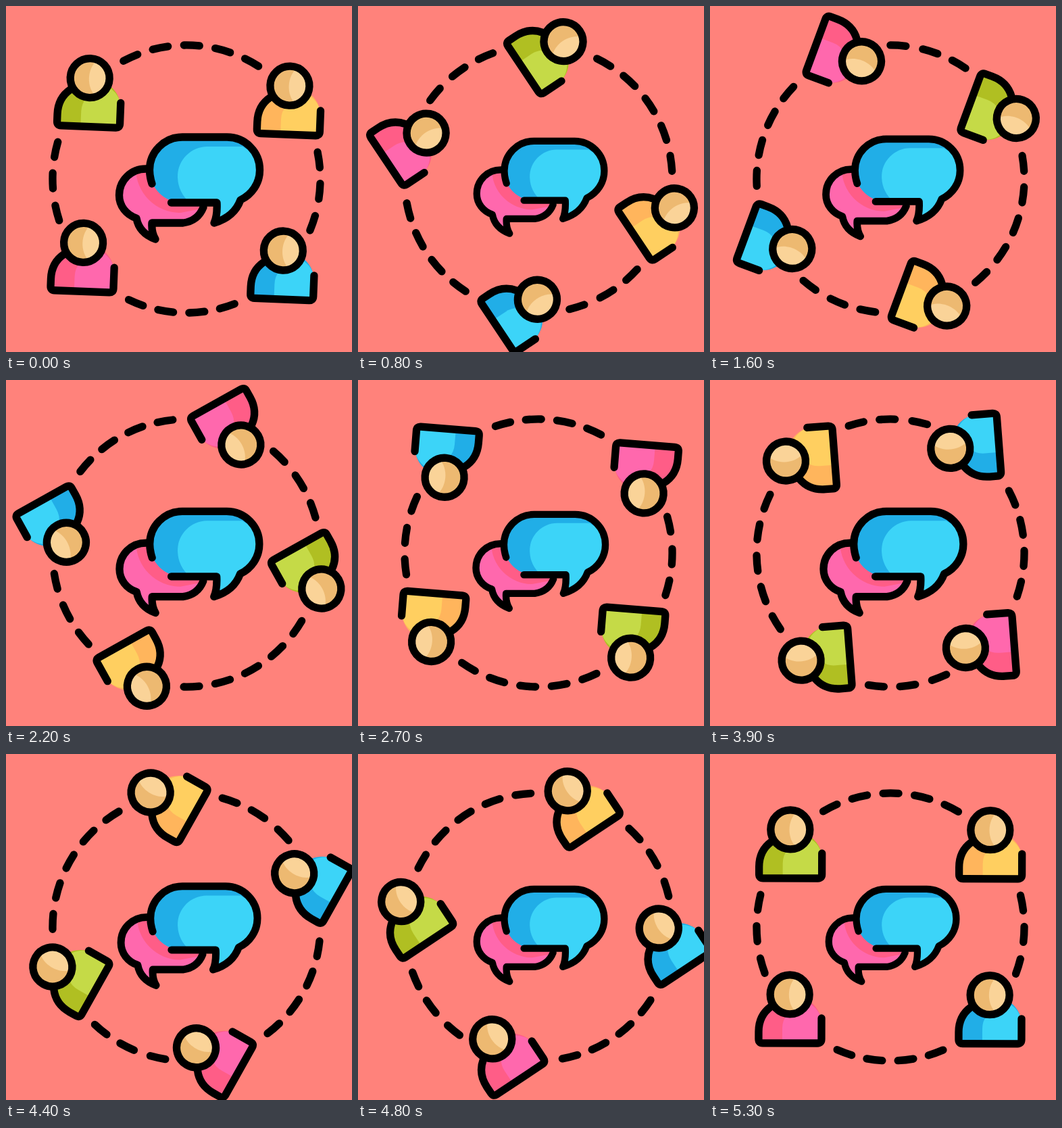
An HTML page for the animation above (5.4 s loop, 512x512 px).

```html
<!DOCTYPE html>
<html lang="en">
<head>
<meta charset="utf-8">
<title>Group chat</title>
<style>
  @property --k { syntax: "<number>"; inherits: true; initial-value: 0; }
  html, body { margin: 0; width: 100%; height: 100%; overflow: hidden; background: #ff827b; }
  svg { display: block; width: 100vw; height: 100vh; animation: tick 5.4s steps(54) infinite; }
  .line { fill: none; stroke: #000; stroke-width: 11.3; stroke-linecap: round; stroke-linejoin: round; }
  #ring {
    transform-origin: 267px 256px;
    transform: rotate(calc(2.25deg + var(--k) * 6.753deg));
  }
  #chat {
    transform-origin: 256px 256px;
    transform: scale(calc(.9458 + .0549 * cos(var(--k) * 18deg - 9deg)));
  }
  @keyframes tick { from { --k: 0; } to { --k: 54; } }
</style>
</head>
<body>
<svg viewBox="0 0 512 512">
  <defs>
    <path id="torso" d="M-46 72V55C-46 38 -39 26 -28 18L-20 12H32C42 20 47 32 47 42V72Z"/>
    <path id="torsoLight" d="M-11 72V50Q-11 38 -4 30L20 15H32C42 22 47 32 47 42V72Z"/>
    <g id="person">
      <path class="line" d="M-28 18C-39 26 -46 38 -46 55V66Q-46 72 -40 72H41Q47 72 47 66V35"/>
      <circle r="29" fill="#edb971"/>
      <path fill="#fad398" d="M10 -27C-5 -14 -5 14 10 27A29 29 0 0 0 10 -27Z"/>
      <circle class="line" r="29"/>
    </g>
    <clipPath id="blue">
      <path d="M261 194H327A48.500 48.500 0 0 1 375.500 243C375.500 262 364 279 347 287Q338 312 308 321Q313 310 312 291H261A48.500 48.500 0 0 1 261 194Z"/>
    </clipPath>
    <clipPath id="pink">
      <path d="M240 241H207C185 241 167.500 258 167.500 280C167.500 296 178 309 193 314Q197 336 221 345Q215 335 216 321H262Q284 318 292 298V241Z"/>
    </clipPath>
  </defs>

  <g id="ring"></g>

  <g id="chat">
    <g clip-path="url(#pink)">
      <rect x="160" y="235" width="140" height="115" fill="#ff68ad"/>
      <path fill="#ff5d87" d="M192 240A66 66 0 0 0 258 306L300 298V235Z"/>
    </g>
    <path class="line" d="M212 241H207C185 241 167.500 258 167.500 280C167.500 296 178 309 193 314Q197 336 221 345Q215 335 216 321H262Q284 318 292 298"/>
    <g clip-path="url(#blue)">
      <rect x="205" y="190" width="180" height="140" fill="#21aee7"/>
      <path fill="#3cd4f8" d="M272 291Q254 275 254 252C254 228 274 208 298 208H350L385 230V330H300V291Z"/>
    </g>
    <path class="line" d="M216 263C214 257 212.500 250 212.500 243A48.500 48.500 0 0 1 261 194H327A48.500 48.500 0 0 1 375.500 243C375.500 262 364 279 347 287Q338 312 308 321Q313 310 312 291H244.500"/>
  </g>
</svg>
<script>
  const ring = document.getElementById("ring");
  const people = [
    [118.4, 112.3, "#b0bf22", "#c5da47"],
    [414.4, 112.3, "#ffb55c", "#ffcf60"],
    [118.4, 356.3, "#ff5d87", "#ff68ad"],
    [414.4, 356.3, "#21aee7", "#3cd4f8"],
  ];
  // Dash centres in degrees, clockwise from the top
  const dashes = [-27, -13.5, 0, 13.5, 27, 79.5, 93, 107, 160, 173.3, 186.7, 200, 253, 267, 280.5];

  const dash = a =>
    `<path class="line" transform="translate(267 256) rotate(${a})" d="M-11.5 -197.700A198 198 0 0 1 11.5 -197.700"/>`;
  const person = ([x, y, dark, light]) =>
    `<g transform="translate(${x} ${y})">
      <use href="#torso" fill="${dark}"/><use href="#torsoLight" fill="${light}"/><use href="#person"/>
    </g>`;

  ring.innerHTML = dashes.map(dash).join("") + people.map(person).join("");
</script>
</body>
</html>
```
